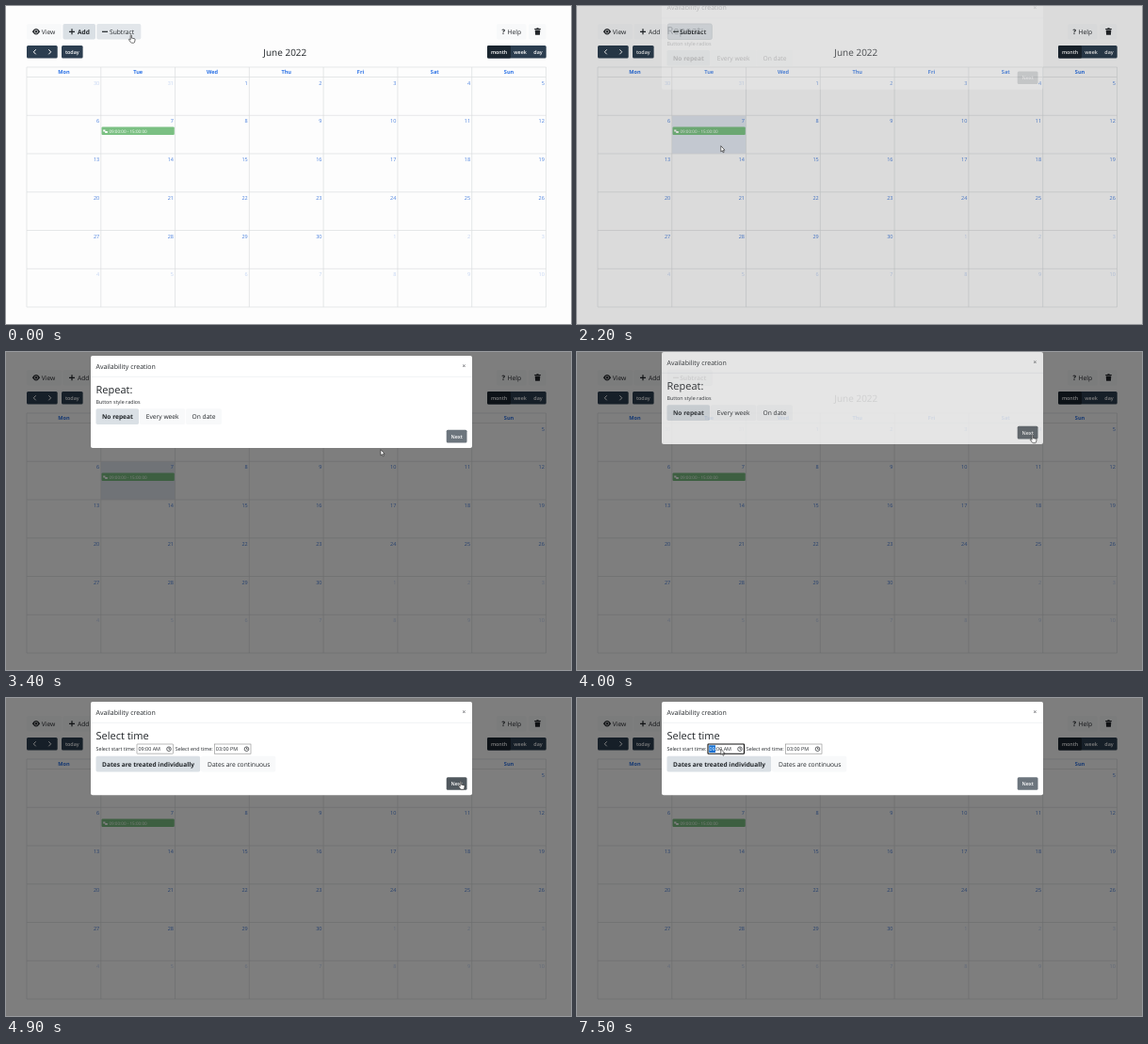
These frames come from a looping animation (600 by 338 pixels, 8 s). An HTML page:

```html
<!DOCTYPE html>
<html lang="en">
<head>
<meta charset="utf-8">
<title>Availability calendar</title>
<style>
  html, body { margin: 0; width: 100%; height: 100%; overflow: hidden; background: #fdfdfd; }
  svg { display: block; width: 100%; height: 100%; }
  text { font: 6.7px "Open Sans", "Noto Sans", sans-serif; fill: #212529; text-rendering: geometricPrecision; white-space: pre; }
  .bold { font-weight: 700; font-size: 6.6px; }
  .title { font-size: 10px; }
  .heading { font-size: 11px; }
  .name { font-size: 7px; }
  .small { font-size: 5.4px; }
  .nav { font-size: 5.4px; font-weight: 600; fill: #fff; }
  .mid { text-anchor: middle; }
  .weekday { font-size: 5.6px; font-weight: 700; fill: #2b72e6; text-anchor: middle; }
  .date { font-size: 5.5px; fill: #4a80de; text-anchor: end; }
  .other { opacity: .32; }
  .event { font-size: 4.6px; fill: #fff; }
  .light { fill: #f8f9fa; }
  .active { fill: #dae0e5; }
  .navy { fill: #2c3e50; }
  .line { fill: none; stroke: #212529; }
</style>
</head>
<body>
<svg viewBox="0 0 600 338" preserveAspectRatio="none">
  <rect width="600" height="338" fill="#fdfdfd"/>

  <!-- toolbar -->
  <rect class="light" x="22" y="19" width="37" height="16.5" rx="1.7"/>
  <path d="M27.8 27.3q4.2-6.4 8.4 0q-4.2 6.4-8.4 0z" fill="#212529"/>
  <circle cx="32" cy="27.3" r="1.7" fill="none" stroke="#fff" stroke-width=".7"/>
  <text x="37.8" y="29.7">View</text>
  <rect id="addBox" x="60.5" y="19" width="34.5" height="16.5" rx="1.7"/>
  <path class="line" d="M67 27.3h6M70 24.3v6" stroke-width="1.2"/>
  <text id="addText" x="76" y="29.7">Add</text>
  <rect id="subBox" x="96.3" y="19" width="47" height="16.5" rx="1.7"/>
  <path class="line" d="M102 27.3h6" stroke-width="1.2"/>
  <text id="subText" x="110" y="29.7">Subtract</text>
  <rect class="light" x="521" y="19" width="31.5" height="16.5" rx="1.7"/>
  <text class="bold" x="526.5" y="30" style="font-size:7.4px">?</text>
  <text x="532.5" y="29.7">Help</text>
  <rect class="light" x="555" y="19" width="18.5" height="16.5" rx="1.7"/>
  <path d="M561.2 24h2l.5-.8h1.6l.5.8h2v1h-6.6zM561.7 25.5h5.6l-.4 5.2h-4.8z" fill="#212529"/>

  <!-- calendar header -->
  <rect class="navy" x="22" y="42" width="32.7" height="13.6" rx="1.5"/>
  <path class="line" d="M31.7 46.3l-2.4 2.5 2.4 2.5M45.3 46.3l2.4 2.5-2.4 2.5" style="stroke:#fff"/>
  <rect class="navy" x="59" y="42" width="22.6" height="13.6" rx="1.5"/>
  <text class="nav mid" x="70.3" y="50.7">today</text>
  <text class="title mid" x="296.3" y="52.5">June 2022</text>
  <rect class="navy" x="511" y="42" width="62.7" height="13.6" rx="1.5"/>
  <rect x="511" y="42" width="25" height="13.6" rx="1.5" fill="#1a252f"/>
  <text class="nav mid" x="523.6" y="50.7">month</text>
  <text class="nav mid" x="546" y="50.7">week</text>
  <text class="nav mid" x="565" y="50.7">day</text>

  <rect id="highlight" x="101" y="116.5" width="78.5" height="40.3" fill="#e1e7f0"/>
  <g id="grid"></g>
  <rect x="101.5" y="128.5" width="77.3" height="8.5" rx="1" fill="#7bc083"/>
  <path d="M103.2 131.6h2.2v2h-2.2zM105.2 133h2.6v1.9h-2.6z" fill="#fff"/>
  <text class="event" x="109.4" y="134.5">09:00:00 - 15:00:00</text>

  <rect id="backdrop" width="600" height="338"/>

  <g id="repeat">
    <rect x="90" width="405" height="98" rx="2" fill="#fff"/>
    <path d="M90 22.3h405" stroke="#e6e8eb" stroke-width=".6"/>
    <text class="name" x="95.5" y="13.8">Availability creation</text>
    <text class="bold mid" x="486.3" y="13.4" fill-opacity=".6">×</text>
    <text class="heading" x="95.5" y="39.7">Repeat:</text>
    <text class="small" x="95.5" y="51">Button style radios</text>
    <rect class="active" x="95.5" y="56.2" width="45.6" height="16.7" rx="1.7"/>
    <rect class="light" x="142" y="56.2" width="48.3" height="16.7" rx="1.7"/>
    <rect class="light" x="191" y="56.2" width="38" height="16.7" rx="1.7"/>
    <text class="bold mid" x="118.4" y="67">No repeat</text>
    <text class="mid" x="166.2" y="67">Every week</text>
    <text class="mid" x="210" y="67">On date</text>
    <rect id="next1" x="467.7" y="78.8" width="21.8" height="13.6" rx="1.5"/>
    <text class="nav mid" x="478.6" y="87.6">Next</text>
  </g>

  <g id="times">
    <rect x="90" width="405" height="99.3" rx="2" fill="#fff"/>
    <path d="M90 22.3h405" stroke="#e6e8eb" stroke-width=".6"/>
    <text class="name" x="95.5" y="13.8">Availability creation</text>
    <text class="bold mid" x="486.3" y="13.4" fill-opacity=".6">×</text>
    <text class="heading" x="95.5" y="39.7">Select time</text>
    <text class="small" x="95.5" y="52.2">Select start time:</text>
    <rect id="field" x="139" y="45" width="38.5" height="10.2" rx=".5" fill="#fff"/>
    <rect id="hourBox" x="140.2" y="46.3" width="6.8" height="7.7" fill="#1470d2"/>
    <text class="small" x="140.5" y="52.2"><tspan id="hour">09</tspan>:00 AM</text>
    <text class="small" x="179.7" y="52.2">Select end time:</text>
    <rect x="221.3" y="45" width="38.7" height="10.2" fill="#fff" stroke="#8a8a8a" stroke-width=".6"/>
    <text class="small" x="222.8" y="52.2">03:00 PM</text>
    <path class="line" stroke-width=".7" d="M170.7 50.2a2.3 2.3 0 1 0 4.6 0a2.3 2.3 0 1 0-4.6 0M173 48.7v1.6h1.2M253.2 50.2a2.3 2.3 0 1 0 4.6 0a2.3 2.3 0 1 0-4.6 0M255.5 48.7v1.6h1.2"/>
    <rect class="active" x="95.5" y="57.7" width="110.7" height="16.8" rx="1.7"/>
    <rect class="light" x="207" y="57.7" width="79.3" height="16.8" rx="1.7"/>
    <text class="bold mid" x="151" y="68.5">Dates are treated individually</text>
    <text class="mid" x="247.2" y="68.5">Dates are continuous</text>
    <rect id="next2" x="467.7" y="80.2" width="21.8" height="13.6" rx="1.5"/>
    <text class="nav mid" x="478.6" y="89">Next</text>
  </g>

  <g id="cursor" fill="#fff" stroke="#333" stroke-width=".7" stroke-linejoin="round">
    <path id="arrow" d="M0 0v6.2l1.4-1.3 1 2.2 1-.5-1-2.1h1.8z"/>
    <path id="hand" d="M-.6.6q.6-1 1.2 0v3l3 .6q.8.2.7 1.2l-.5 2.4q-.2.9-.9.9h-2.2q-.7 0-1.1-.7l-2-2.8q.2-.9 1.1-.4l.7.6z"/>
  </g>
</svg>
<script>
  const LOOP = 8000, STEP = 100, DROP = 21;
  const $ = id => document.getElementById(id);
  const clamp = v => Math.max(0, Math.min(1, v));
  const easeOut = p => 1 - (1 - clamp(p)) ** 2;
  const easeInOut = p => p * p * (3 - 2 * p);
  const show = (id, on) => $(id).setAttribute("visibility", on ? "visible" : "hidden");
  const fill = (id, color) => $(id).setAttribute("fill", color);

  function buildGrid() {
    const left = 22, top = 75.5, colW = 78.78, rowH = 40.75;
    const right = left + 7 * colW, bottom = top + 6 * rowH;
    let lines = `M${left} 65H${right}`, labels = "";
    for (let c = 0; c <= 7; c++) lines += `M${left + c * colW} 65V${bottom}`;
    for (let r = 0; r <= 6; r++) lines += `M${left} ${top + r * rowH}H${right}`;
    ["Mon", "Tue", "Wed", "Thu", "Fri", "Sat", "Sun"].forEach((day, c) => {
      labels += `<text class="weekday" x="${left + (c + .5) * colW}" y="72.3">${day}</text>`;
    });
    for (let i = 0; i < 42; i++) {
      const date = new Date(2022, 4, 30 + i);
      const x = left + (i % 7 + 1) * colW - 1.6, y = top + Math.floor(i / 7) * rowH + 8;
      labels += `<text class="date${date.getMonth() === 5 ? "" : " other"}" x="${x}" y="${y}">${date.getDate()}</text>`;
    }
    $("grid").innerHTML = `<path d="${lines}" fill="none" stroke="#dcdee0" stroke-width=".7"/>${labels}`;
  }

  // time, x, y of the pointer tip
  const path = [
    [0, 132.8, 30.5], [600, 132.8, 30.5], [1400, 151.5, 112], [1700, 152.8, 148.7],
    [2800, 152.8, 148.7], [3700, 483.7, 88], [4600, 483.7, 88], [4900, 482.8, 88.5],
    [5300, 482.8, 88.5], [6200, 208, 82], [6800, 208, 82], [7300, 152.8, 54.2], [LOOP, 152.8, 54.2]
  ];

  function pointer(t) {
    const i = path.findIndex(k => k[0] > t);
    const [t0, x0, y0] = path[i - 1], [t1, x1, y1] = path[i];
    const p = easeInOut((t - t0) / (t1 - t0));
    return [x0 + (x1 - x0) * p, y0 + (y1 - y0) * p];
  }

  function place(id, opacity, offset) {
    $(id).setAttribute("opacity", opacity);
    $(id).setAttribute("transform", `translate(0 ${4 - DROP * offset})`);
  }

  const shown = (t, start) => t < start ? 0 : clamp((t - start + 25) / 125);
  const raised = (t, start) => 1 - easeOut((t - start + 55) / 270);
  const shade = (t, start) => t < start ? 0 : .5 * clamp((t - start + 36) / 136);

  function draw(t) {
    const subtract = t >= 600, focused = t >= 7300;
    fill("addBox", subtract ? "#f8f9fa" : "#dae0e5");
    fill("subBox", subtract ? "#dae0e5" : "#e2e6ea");
    $("subBox").setAttribute("stroke", subtract ? "#d0d5da" : "none");
    $("addText").setAttribute("class", subtract ? "" : "bold");
    $("subText").setAttribute("class", subtract ? "bold" : "");
    $("subText").setAttribute("x", subtract ? 109.2 : 110);

    show("highlight", t >= 2000 && t < 4000);
    $("backdrop").setAttribute("opacity", t < 4200 ? shade(t, 2200) : shade(t, 4200));

    const closing = 3970;
    if (t < closing) place("repeat", shown(t, 2200), raised(t, 2200));
    else place("repeat", clamp(1 - (t - closing) / 150), easeOut((t - closing) / 300));
    place("times", shown(t, 4200), raised(t, 4200));

    const over1 = t >= 3600 && t < 4200, over2 = t >= 4700 && t < 5500;
    fill("next1", over1 ? "#5a6268" : "#6c757d");
    fill("next2", over2 ? "#50585e" : "#6c757d");

    $("field").setAttribute("stroke", focused ? "#111" : "#8a8a8a");
    $("field").setAttribute("stroke-width", focused ? 1.1 : .6);
    $("hourBox").setAttribute("opacity", focused ? 1 : 0);
    $("hour").style.fill = focused ? "#fff" : "";

    const hand = t < 800 || over1 || over2;
    show("hand", hand);
    show("arrow", !hand);
    $("cursor").setAttribute("transform", `translate(${pointer(t)})`);
  }

  buildGrid();
  const start = performance.now();
  function tick() {
    const t = (performance.now() - start) % LOOP;
    draw(Math.floor(t / STEP) * STEP);
    requestAnimationFrame(tick);
  }
  tick();
</script>
</body>
</html>
```
